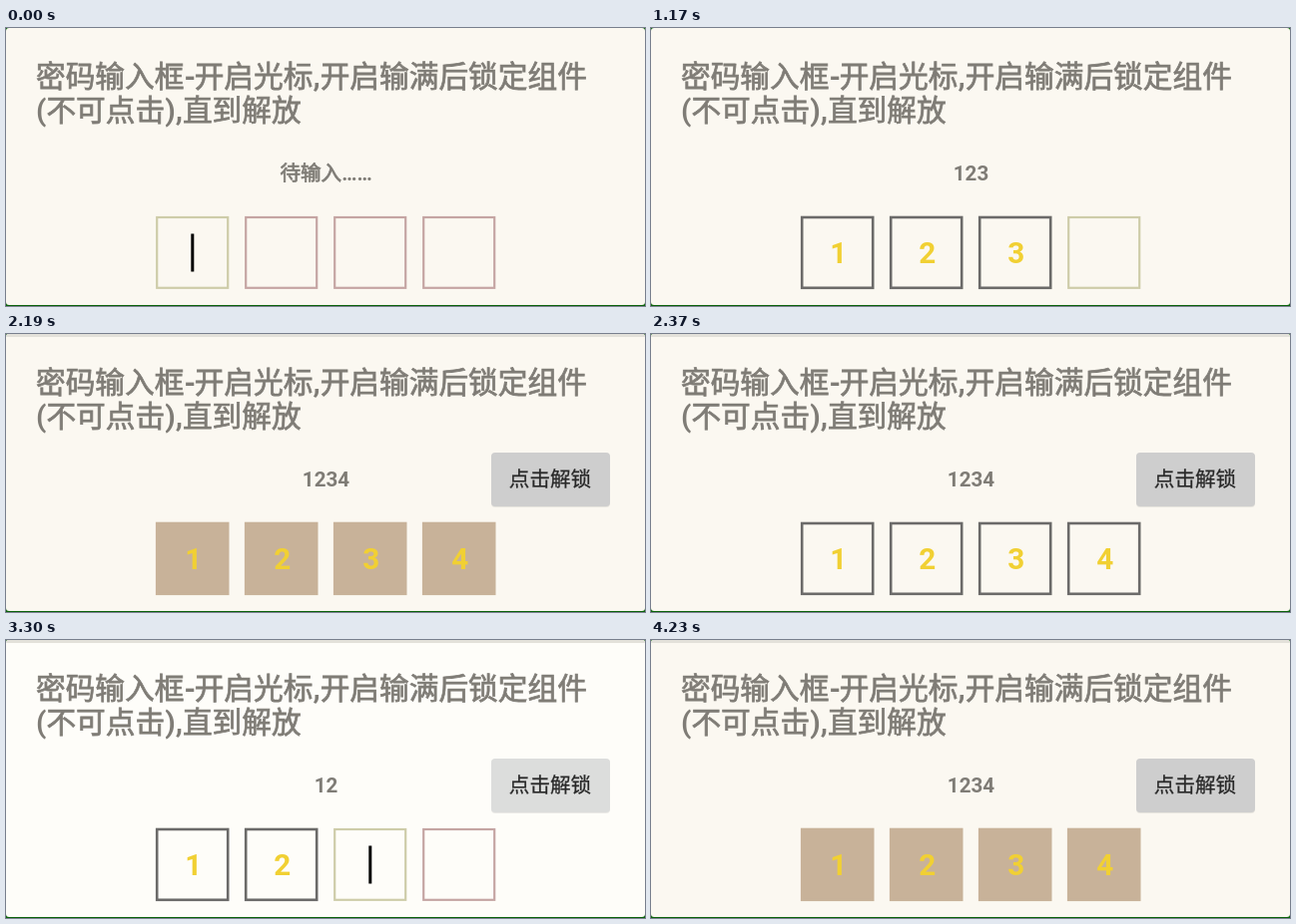
Recreate the animation shown at these times as an HTML page. Size 640 by 279 pixels, loop 4.29 s.

```html
<!DOCTYPE html>
<html lang="zh-CN">
<meta charset="utf-8">
<style>
html, body { margin: 0; width: 100%; height: 100%; overflow: hidden; background: #0b640b }
svg { display: block; width: 640px; height: 279px }
text { font-family: Roboto, "Noto Sans CJK SC", "Noto Sans CJK", sans-serif; fill: #7f7c76; stroke: #7f7c76; stroke-width: .75px }
.b { font-weight: 700; stroke: none }
.title { font-size: 29.7px }
.small { font-size: 20.6px; text-anchor: middle }
.small tspan:not(.b) { stroke-width: .5px }
.digit { font-size: 29.7px; text-anchor: middle; fill: #f1d033 }
#button text { fill: #282828; stroke: #282828; stroke-width: .25px }
</style>
<svg viewBox="0 0 640 279">
  <rect id="card" width="640" height="278" rx="3"/>
  <rect id="edge" width="640" height="3" rx="1.5" fill="#e3e1da"/>
  <text class="title" x="30" y="58.5">密码输入框<tspan class="b">-</tspan><tspan dx="-1.3">开启光标</tspan><tspan class="b">,</tspan>开启输满后锁定组件</text>
  <text class="title" x="30" y="93"><tspan class="b">(</tspan>不可点击<tspan class="b">),</tspan>直到解放</text>
  <text class="small" id="hint" x="320.5" y="153">待输入<tspan class="b">……</tspan></text>
  <text class="small b" id="value" x="320.5" y="153.3"></text>
  <g id="button">
    <rect x="486" y="120" width="119" height="54" rx="4" fill="#000" opacity=".08"/>
    <rect id="face" x="486" y="119" width="119" height="54" rx="4"/>
    <text class="small" x="545" y="153.3">点击解锁</text>
  </g>
  <g id="cells"></g>
  <rect id="cursor" y="206.5" width="3" height="38"/>
</svg>
<script>
const LOOP = 4290, PITCH = 89, BLINK = 700;
// [start ms, digits entered, locked]
const STEPS = [
  [0, 0], [420, 1], [780, 2], [1080, 3], [1380, 4, true],
  [2280, 4], [2850, 3], [3120, 2], [3450, 3], [3720, 4, true]
];
const $ = id => document.getElementById(id);
const show = (el, on) => el.setAttribute('visibility', on ? 'visible' : 'hidden');

function add(tag, attrs) {
  const el = document.createElementNS('http://www.w3.org/2000/svg', tag);
  for (const key in attrs) el.setAttribute(key, attrs[key]);
  return $('cells').appendChild(el);
}

const cells = [0, 1, 2, 3].map(i => {
  const box = add('rect', { x: 151.2 + i * PITCH, y: 190, width: 71, height: 70.8 });
  const digit = add('text', { class: 'digit b', x: 187.7 + i * PITCH, y: 236.3 });
  digit.textContent = i + 1;
  return { box, digit };
});

function draw(t) {
  const [, count, locked] = STEPS.findLast(s => s[0] <= t);
  const bright = t >= 2550 && t < 3450;
  $('card').setAttribute('fill', bright ? '#fefdf9' : '#fbf8f1');
  $('face').setAttribute('fill', bright ? '#dcdddc' : '#cecece');
  show($('button'), t >= 1380);
  show($('edge'), t >= 1380);
  show($('hint'), !count);
  $('value').textContent = '1234'.slice(0, count);

  cells.forEach(({ box, digit }, i) => {
    const line = locked ? '#c8b299' : i < count ? '#6b6a69' : i === count ? '#cecca9' : '#c5a5a3';
    box.setAttribute('stroke', line);
    box.setAttribute('stroke-width', i < count ? 2.6 : 2.2);
    box.setAttribute('fill', locked ? line : 'none');
    show(digit, i < count);
  });

  $('cursor').setAttribute('x', 185.3 + count * PITCH);
  show($('cursor'), count < 4 && Math.floor(t / BLINK) % 2 === 0);
}

const start = performance.now();
function frame() {
  draw((performance.now() - start) % LOOP);
  requestAnimationFrame(frame);
}
frame();
</script>
</html>
```
